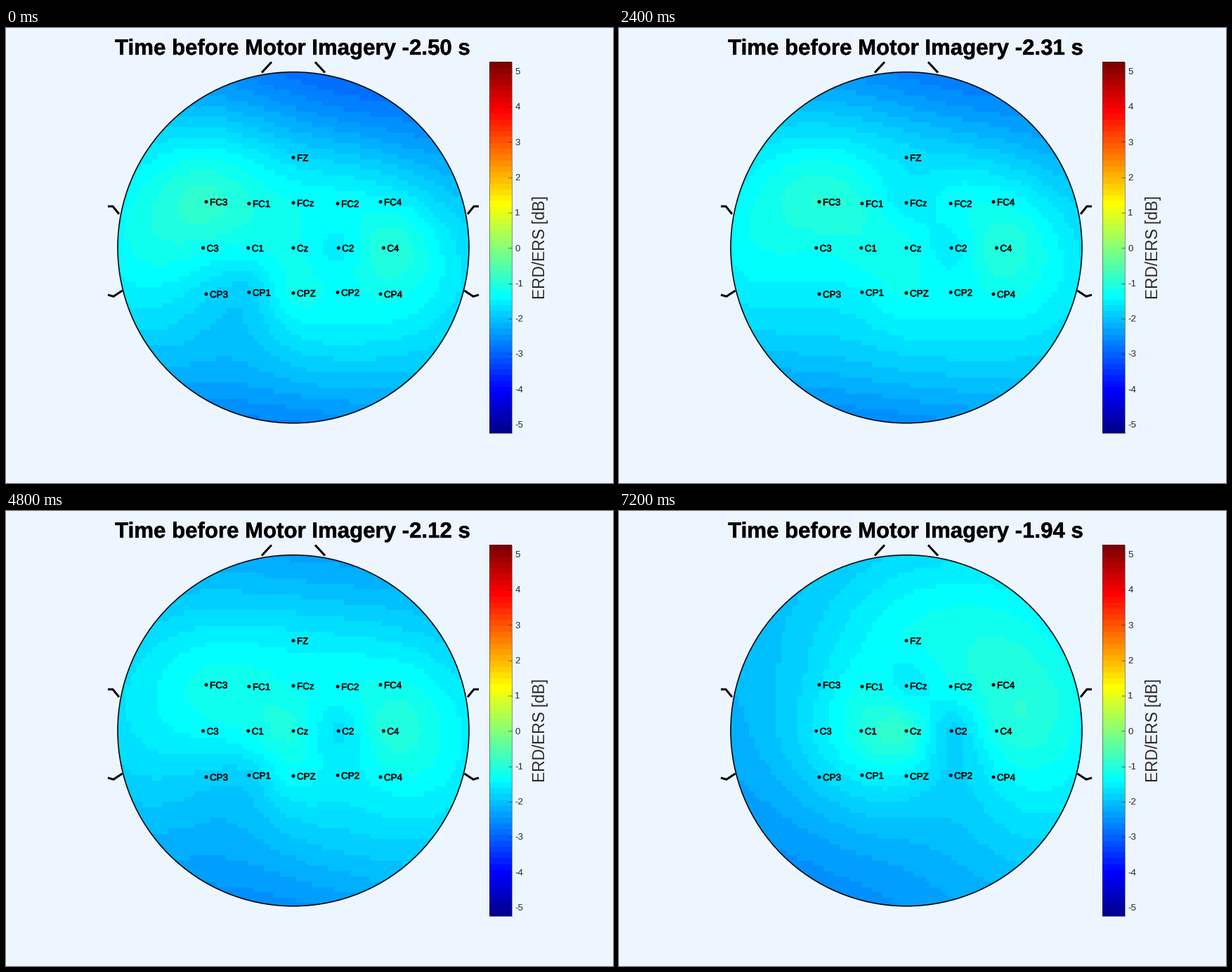
A matplotlib script that plays this animation: 864x648 px, repeating every 8 s.

```python
import numpy as np
import matplotlib.pyplot as plt
from matplotlib.animation import FuncAnimation
from matplotlib.colors import ListedColormap
from matplotlib.patches import Circle, Rectangle
from matplotlib.patheffects import withStroke

W, H = 864, 648
FRAMES, INTERVAL = 10, 800
CX, CY, R = 409, 312.7, 250
CELLS = 67
BACK, INK = (0.93, 0.96, 1.0), "#262626"

plt.rcParams["font.family"] = "Liberation Sans"


def montage():
    """Electrode positions: three slightly bowed rows and a front midline site."""
    spots = {"FZ": (CX, 184.5)}
    for row, prefix, middle in ((-1, "FC", "z"), (0, "C", "z"), (1, "CP", "Z")):
        for col, suffix in zip(range(-2, 3), ("3", "1", middle, "2", "4")):
            k = abs(col)
            x = CX + col * (64.2 - 1.1 * k * abs(row))
            y = 313.2 + row * (64.2 - 2.75 * k + 1.75 * k * k)
            spots[prefix + suffix] = (x, y)
    return spots


ELECTRODES = montage()

# Colour level (0 to 64) at the main peaks and dips: start, end
PEAKS = {
    "FZ": (21.3, 24.0), "FC3": (26.6, 21.8), "FC1": (25.1, 24.1),
    "FC2": (23.6, 24.0), "C3": (24.4, 22.2), "Cz": (24.3, 26.4),
    "C2": (22.6, 20.6), "C4": (25.9, 25.1), "CPZ": (24.4, 22.7),
    "CP2": (23.7, 20.8),
}
WAVES = ("CP1", "FCz")


def mix(a, b, u):
    return a + (b - a) * u


def jet64():
    i = np.arange(64)

    def ramp(k):
        return np.clip(np.minimum(k - 7, 55 - k) / 16, 0, 1)

    return ListedColormap(np.column_stack([ramp(i - 16), ramp(i), ramp(i + 16)]))


def green(p, q):
    """Biharmonic spline kernel between two sets of points."""
    d = np.linalg.norm(p[:, None] - q[None], axis=2)
    return d**2 * (np.log(np.maximum(d, 1e-12)) - 1)


angles = np.arange(16) * np.pi / 8
sites = [ELECTRODES[name] for name in (*PEAKS, *WAVES)]
nodes = np.vstack([(np.array(sites) - (CX, CY)) / (R, -R),
                   np.column_stack([np.cos(angles), np.sin(angles)])])
axis = np.linspace(-1, 1, CELLS)
gx, gy = np.meshgrid(axis, axis)
spread = green(np.column_stack([gx.ravel(), gy.ravel()]), nodes)
system = green(nodes, nodes)


def rim(t):
    """Levels round the edge: a tilt that turns while the oval shape fades."""
    u = t * t
    return (mix(18.8, 20.1, t)
            + mix(-1.1, 2.5, u) * np.cos(angles)
            + mix(-0.7, 2.0, u) * np.sin(angles)
            + mix(3.6, 1.0, u) * np.cos(2 * angles)
            + mix(-1.4, 0.0, u) * np.sin(2 * angles))


def scalp(step):
    t = step / (FRAMES - 1)
    wave = np.cos(2 * np.pi * step / 6.5)
    peaks = [mix(a, b, t * t) for a, b in PEAKS.values()]
    values = np.hstack([peaks, 21.8 - 1.2 * wave, 23.1 + 0.9 * wave, rim(t)])
    mean = values.mean()
    field = spread @ np.linalg.solve(system, values - mean) + mean
    return field.reshape(gx.shape)


fig = plt.figure(figsize=(W / 72, H / 72), dpi=72, facecolor=BACK)
ax = fig.add_axes([0, 0, 1, 1])
ax.axis("off")
cmap = jet64()


def show(data, extent):
    return ax.imshow(data, cmap=cmap, vmin=0, vmax=64, extent=extent,
                     origin="lower", aspect="auto", interpolation="nearest")


def line(points, width=3, color="black"):
    ax.plot(*zip(*points), color=color, lw=width, solid_capstyle="butt",
            solid_joinstyle="miter")


def bold(width):
    return [withStroke(linewidth=width, foreground="black")]


# Head
reach = R * CELLS / (CELLS - 1)
head = show(scalp(0), (CX - reach, CX + reach, CY + reach, CY - reach))
head.set_clip_path(Circle((CX, CY), R, transform=ax.transData))
ax.add_patch(Circle((CX, CY), R, fill=False, ec="black", lw=1.6))
for side in (-1, 1):
    for shape in ([(45, 63.5), (31, 48.5)],
                  [(264, 254), (257, 254), (248, 265)],
                  [(264, 380), (256, 382.3), (243.5, 374)]):
        line([(CX + side * x, y) for x, y in shape])

# Electrodes
for name, (x, y) in ELECTRODES.items():
    ax.add_patch(Circle((x, y), 2.5, fc="black", lw=0))
    ax.text(x + 5, y + 5, name, size=13.4, va="baseline",
            path_effects=bold(0.5))

# Colour bar
show(np.arange(64)[:, None] + 0.5, (688, 719.5, 577.3, 49))
ax.add_patch(Rectangle((688, 49), 31.5, 528.3, fill=False, ec=INK, lw=0.5))
for v in range(-5, 6):
    y = 313.2 - v * 50.32
    line([(714.5, y), (719.5, y)], 0.6, INK)
    ax.text(724.3, y + 4.3, str(v), size=13.3, color=INK, va="baseline")
ax.text(771.5, 312, "ERD/ERS [dB]", size=22.6, color=INK, rotation=90,
        ha="right", va="center")

title = ax.text(408.5, 38, "", size=31.2, weight="bold", ha="center",
                va="baseline", path_effects=bold(0.4))
ax.set_xlim(0, W)
ax.set_ylim(H, 0)


def update(step):
    head.set_data(scalp(step))
    title.set_text(f"Time before Motor Imagery {-2.5 + step / 16:.2f} s")
    return head, title


anim = FuncAnimation(fig, update, frames=FRAMES, interval=INTERVAL,
                     repeat=True, repeat_delay=0)
plt.show()
```
